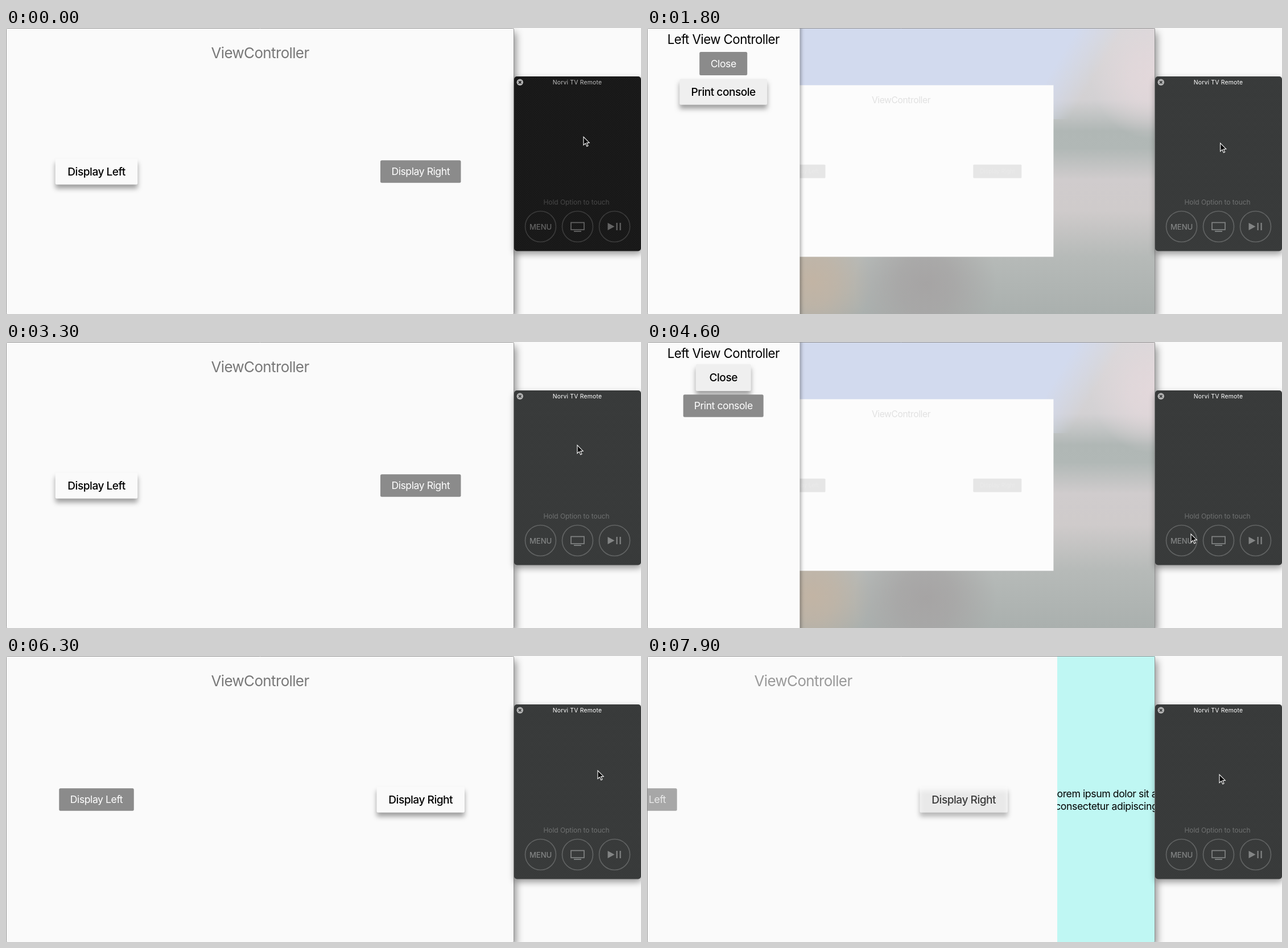
These frames come from a looping animation (1116 by 502 pixels, 8000 ms). An HTML page with a canvas:

```html
<!DOCTYPE html>
<html lang="en">
<head>
<meta charset="utf-8">
<title>Slide menu demo</title>
<style>
  html, body { margin: 0; width: 100%; height: 100%; overflow: hidden; background: #fafafa; }
  canvas { display: block; }
</style>
</head>
<body>
<canvas id="stage" width="1116" height="502"></canvas>
<script>
const ctx = document.getElementById('stage').getContext('2d');
const LOOP = 8000, STEP = 100;
const WIN = 893, H = 502, MENU_W = 268.5;

const clamp = v => Math.max(0, Math.min(1, v));
const ramp = (t, a, b) => clamp((t - a) / (b - a));
const ease = p => p * p * (3 - 2 * p);
const glide = (t, a, b) => ease(ramp(t, a, b));
const mix = (a, b, p) => a + (b - a) * p;
const gray = v => `rgb(${v},${v},${v})`;

// time, x, y of the pointer tip
const POINTER = [
  [0, 1015, 191], [300, 1015, 192], [800, 1010, 203], [1200, 1010, 203],
  [1600, 1009, 214], [2100, 1005, 180], [2700, 1004, 175], [3300, 1004, 181],
  [4100, 1006, 190], [4550, 956, 337], [4900, 956, 337], [5500, 1012, 203],
  [5800, 1012, 203], [6250, 1040, 201], [7100, 1040, 202], [7900, 1006, 208]
];

function pointerAt(t) {
  const i = POINTER.findIndex(k => k[0] > t);
  if (i < 0) return POINTER[POINTER.length - 1].slice(1);
  const [a, b] = [POINTER[i - 1], POINTER[i]];
  const p = glide(t, a[0], b[0]);
  return [mix(a[1], b[1], p), mix(a[2], b[2], p)];
}

function text(str, x, cy, size, color, weight = 400, spacing = -0.025) {
  ctx.font = `${weight} ${size}px Inter, sans-serif`;
  ctx.letterSpacing = spacing * size + 'px';
  ctx.textAlign = 'center';
  ctx.fillStyle = color;
  ctx.fillText(str, x, cy + size * 0.36);
}

function box(x, y, w, h, r, fill) {
  ctx.beginPath();
  ctx.roundRect(x, y, w, h, r);
  ctx.fillStyle = fill;
  ctx.fill();
}

function shadowed(color, blur, dx, dy, draw) {
  ctx.save();
  Object.assign(ctx, { shadowColor: color, shadowBlur: blur, shadowOffsetX: dx, shadowOffsetY: dy });
  draw();
  ctx.restore();
}

function line(...points) {
  ctx.beginPath();
  points.forEach(([x, y]) => ctx.lineTo(x, y));
}

function button(label, cx, cy, w, h, focus, bright = 250) {
  const bw = w + 13 * focus, bh = h + 6 * focus;
  shadowed(`rgba(0,0,0,${0.36 * focus})`, 8, 0, 7 * focus, () =>
    box(cx - bw / 2, cy - bh / 2, bw, bh, 2.5, gray(mix(139, bright, focus))));
  text(label, cx, cy, 17.6 * (1 + 0.085 * focus), gray(mix(255, 0, focus)), focus > 0.5 ? 500 : 400);
}

function blob(x, y, r, rgb) {
  const g = ctx.createRadialGradient(x, y, 0, x, y, r);
  g.addColorStop(0, `rgba(${rgb},1)`);
  g.addColorStop(0.4, `rgba(${rgb},.75)`);
  g.addColorStop(1, `rgba(${rgb},0)`);
  ctx.fillStyle = g;
  ctx.fillRect(x - r, y - r, 2 * r, 2 * r);
}

function backdrop() {
  const g = ctx.createLinearGradient(0, 0, 0, H);
  [[0, '#dad8da'], [0.25, '#d3d1d3'], [0.36, '#b0b7b5'], [0.42, '#b1b8b6'], [0.53, '#d0cccd'],
   [0.64, '#cfcbcb'], [0.8, '#b6bab8'], [1, '#aab0ae']].forEach(s => g.addColorStop(...s));
  ctx.fillStyle = g;
  ctx.fillRect(0, 0, WIN, H);
  blob(890, 85, 110, '227,216,219');
  blob(290, 445, 105, '194,180,164');
  blob(490, 450, 125, '166,164,164');
  const sky = ctx.createLinearGradient(735, 35, 795, 71);
  sky.addColorStop(0, 'rgba(210,218,238,1)');
  sky.addColorStop(1, 'rgba(210,218,238,0)');
  ctx.fillStyle = sky;
  ctx.fillRect(0, 0, WIN, 160);
}

function mainView(left, shift, rightFocus) {
  const s = 1 - 0.4 * left, cx = 446.5, cy = 251;
  ctx.save();
  ctx.translate(cx - shift, cy);
  ctx.scale(s, s);
  ctx.translate(-cx, -cy);
  ctx.fillStyle = gray(mix(250, 252, left));
  ctx.fillRect(0, 0, WIN, H);
  ctx.globalAlpha = 1 - 0.8 * left - 0.25 * shift / 172;
  const leftFocus = (1 - clamp(left * 3)) * (1 - rightFocus);
  text('ViewController', 446.5, 43.5, 26, '#787878');
  button('Display Left', 159, 252, 131.5, 39.5, leftFocus);
  button('Display Right', 728.7, 252, 141.5, 39.5, rightFocus);
  ctx.restore();
}

function leftMenu(edge, printFocus) {
  const cx = edge - 134.3;
  shadowed('rgba(0,0,0,.45)', 7, 1, 0, () => box(edge - 275, -10, 275, H + 20, 0, '#fbfbfb'));
  text('Left View Controller', cx, 20, 22.3, '#000');
  button('Close', cx, 62.5, 84, 41, 1 - printFocus, 239);
  button('Print console', cx, 112, 141, 39.5, printFocus, 239);
}

function rightMenu(shift) {
  ctx.fillStyle = '#bff7f3';
  ctx.fillRect(WIN - shift, 0, shift, H);
  const cx = 821 + (172 - shift) / 2;
  ctx.save();
  ctx.beginPath();
  ctx.rect(WIN - shift, 0, shift, H);
  ctx.clip();
  text('Lorem ipsum dolor sit amet,', cx, 241.5, 17.7, '#000');
  text('consectetur adipiscing elit', cx, 263.5, 17.7, '#000');
  ctx.restore();
}

function remote(active) {
  const body = active ? '#393b3b' : '#1a1a1a', grain = active ? '#353737' : '#131313';
  const ring = active ? '#616363' : '#3b3b3b', icon = active ? '#828484' : '#646464';
  shadowed('rgba(0,0,0,.4)', 12, 1, 5, () => box(WIN, 85, 223, 306.5, 5, body));
  ctx.fillStyle = grain;
  for (let y = 88; y < 389; y += 2)
    for (let x = 896 + y % 4; x < 1114; x += 4) ctx.fillRect(x, y, 1, 1);
  box(897.5, 89.5, 11.5, 11.5, 6, '#b4b4b4');
  ctx.strokeStyle = body;
  ctx.lineWidth = 1.7;
  line([901, 93], [905.5, 97.5]); ctx.stroke();
  line([905.5, 93], [901, 97.5]); ctx.stroke();
  text('Norvi TV Remote', 1004, 95, 10.4, active ? '#fff' : '#bdbdbd', 400, 0.02);
  text('Hold Option to touch', 1002.5, 306, 12, active ? '#6f7171' : '#474747', 400, -0.005);

  ctx.strokeStyle = ring;
  for (const x of [939.5, 1004.5, 1069.5]) {
    ctx.beginPath();
    ctx.arc(x, 348.5, 27, 0, 7);
    ctx.stroke();
  }
  text('MENU', 939.5, 348.8, 13.2, icon, 500, -0.01);
  ctx.strokeStyle = ctx.fillStyle = icon;
  ctx.strokeRect(993, 341.5, 23, 12.5);
  ctx.fillRect(998, 356, 13, 1.8);
  line([1057.5, 342], [1069.5, 348.5], [1057.5, 355]);
  ctx.fill();
  ctx.fillRect(1072.5, 342, 2.2, 13);
  ctx.fillRect(1078.5, 342, 2.2, 13);
}

function pointer([x, y]) {
  ctx.save();
  ctx.translate(x, y);
  line([0, 0], [0, 14.5], [3.4, 11.4], [5.8, 16.8], [8, 15.8], [5.7, 10.6], [10.2, 10.4]);
  ctx.closePath();
  ctx.fillStyle = '#000';
  ctx.fill();
  ctx.strokeStyle = '#fff';
  ctx.lineWidth = 1.1;
  ctx.stroke();
  ctx.restore();
}

function draw(t) {
  const left = glide(t, 350, 840) - glide(t, 2680, 3180) + glide(t, 3750, 4250) - glide(t, 4700, 5200);
  const rightFocus = glide(t, 5900, 6100);
  const printFocus = glide(t, 1300, 1500) - glide(t, 2050, 2250);
  const shift = 172 * ramp(t, 7200, 7900) ** 1.5;

  ctx.fillStyle = '#fafafa';
  ctx.fillRect(0, 0, 1116, H);
  shadowed('rgba(0,0,0,.45)', 14, 3, 8, () => box(0, 0, WIN, H, 2, '#fafafa'));

  ctx.save();
  ctx.beginPath();
  ctx.rect(0, 0, WIN, H);
  ctx.clip();
  if (left > 0.001) backdrop();
  mainView(left, shift, rightFocus);
  if (shift > 0) rightMenu(shift);
  if (left > 0.001) leftMenu(MENU_W * left, printFocus);
  ctx.restore();

  ctx.strokeStyle = '#929292';
  ctx.lineWidth = 1;
  ctx.beginPath();
  ctx.roundRect(0.5, 0.5, WIN - 1, H, 2);
  ctx.stroke();

  remote(t >= 200);
  pointer(pointerAt(t));
}

function tick() {
  const t = performance.now() % LOOP;
  draw(Math.floor(t / STEP) * STEP);
  requestAnimationFrame(tick);
}
tick();
</script>
</body>
</html>
```
